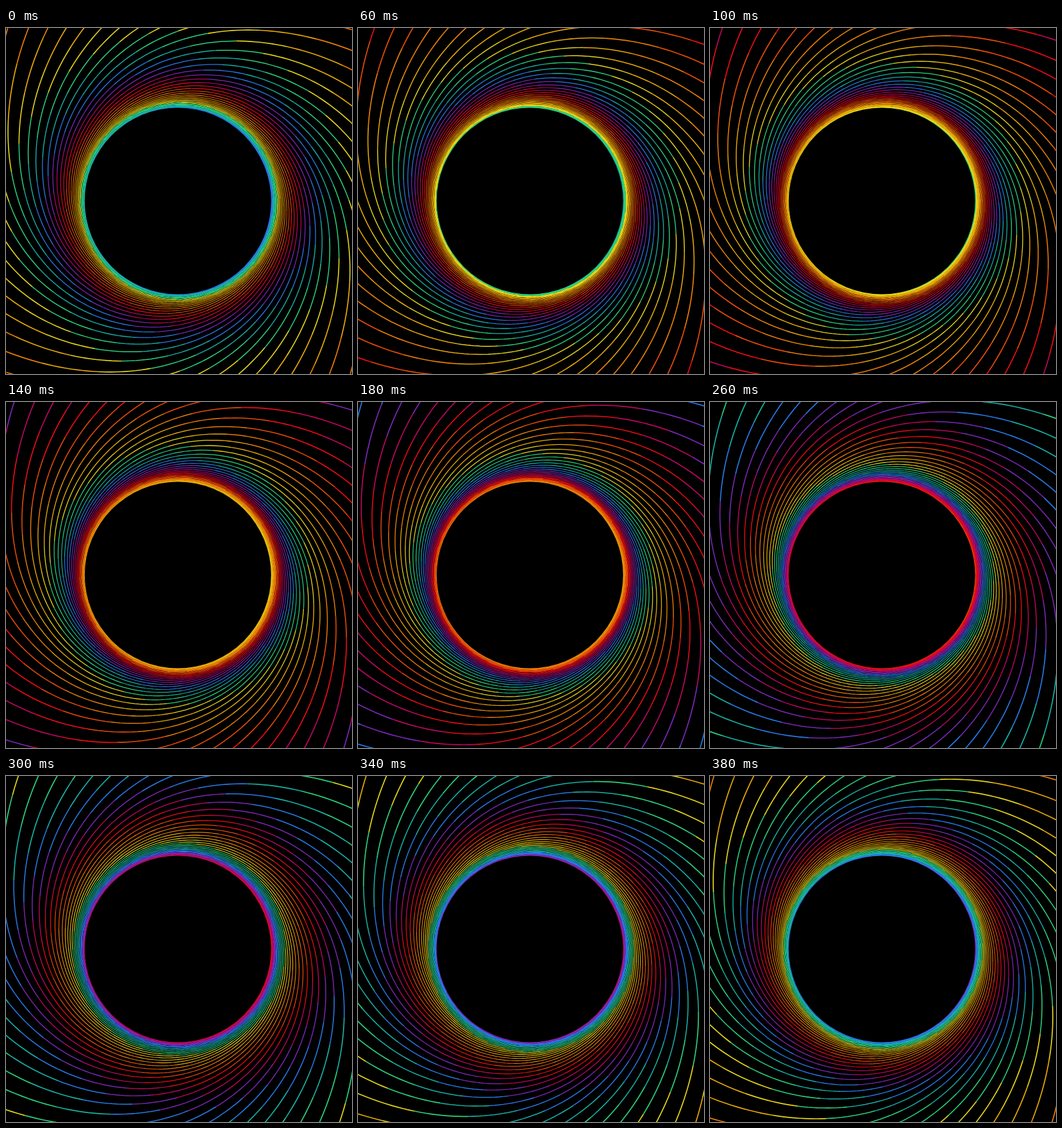
These frames come from a looping animation (540x540 px, 400 ms). An HTML page with a canvas:

```html
<!DOCTYPE html>
<html>
<head>
<meta charset="utf-8">
<style>
  html, body { margin: 0; height: 100%; overflow: hidden; background: #000; }
  canvas { display: block; }
</style>
</head>
<body>
<canvas id="stage" width="540" height="540"></canvas>
<script>
const ctx = document.getElementById('stage').getContext('2d');
const LOOP = 400, STEPS = 20, ARMS = 36, CENTER = 270, SAMPLES = 10;
const DEG = Math.PI / 180;

// Colours from the outside in
const COLORS = ['#e80c14', '#e84a08', '#e87c08', '#e8a808', '#e4d41c',
                '#2cd07c', '#18b0a4', '#2878e4', '#7a28b4', '#b8085c'];

// Radius at a depth counted in colour bands
const bandRadius = depth =>
  Math.max(141, 125 * Math.exp(Math.exp(0.04 - 0.13 * depth)));

// Angle at which an arm reaches a radius; arms close in on a circle of 140
const armAngle = r => Math.log(Math.log(r / 140) / 0.581) / 0.561;

function drawBand(depth, color, turn) {
  const points = [];
  for (let i = 0; i <= SAMPLES; i++) {
    const r = bandRadius(depth + i / SAMPLES);
    points.push([r, armAngle(r) + turn]);
  }
  ctx.beginPath();
  for (let arm = 0; arm < ARMS; arm++) {
    points.forEach(([r, a], i) => {
      const angle = a + arm * 2 * Math.PI / ARMS;
      const x = CENTER + r * Math.cos(angle), y = CENTER + r * Math.sin(angle);
      if (i) ctx.lineTo(x, y); else ctx.moveTo(x, y);
    });
  }
  ctx.strokeStyle = color;
  ctx.lineWidth = Math.min(1.7, 0.35 + bandRadius(depth + 0.5) / 220);
  ctx.stroke();
}

function draw(step) {
  ctx.fillStyle = '#000';
  ctx.fillRect(0, 0, 540, 540);
  const shift = (step + 17) / 2, whole = Math.floor(shift);
  for (let k = -2; k <= 16; k++) {
    const color = COLORS[(k + 21 - whole) % COLORS.length];
    drawBand(k + shift - whole, color, -step * DEG);
  }
  ctx.beginPath();
  ctx.arc(268.3, 270, 145.5, 0, 2 * Math.PI);
  ctx.fill();
}

function tick() {
  draw(Math.floor(performance.now() % LOOP / LOOP * STEPS));
  requestAnimationFrame(tick);
}
tick();
</script>
</body>
</html>
```
